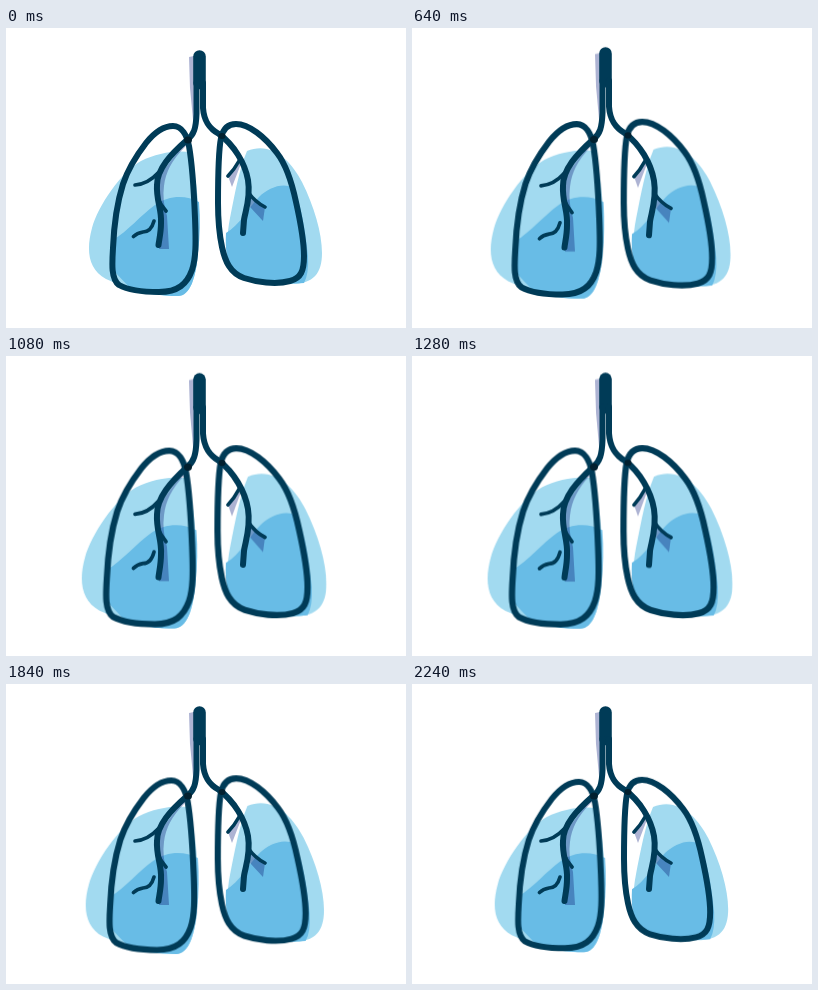
Animation, 400 px wide and 300 px high, one loop 2.28 s. Source, as an HTML page:

```html
<!DOCTYPE html>
<html lang="en">
<head>
<meta charset="utf-8">
<title>Breathing lungs</title>
<style>
  html, body { margin: 0; width: 100%; height: 100%; overflow: hidden; background: #fff; }
  svg { display: block; width: 100vw; height: 100vh; }

  .light { fill: #a2daf0; }
  .deep { fill: #68bce6; }
  .shade { fill: #adb3d3; mix-blend-mode: multiply; }
  .line { fill: none; stroke: #003b57; stroke-width: 6; stroke-linecap: round; stroke-linejoin: round; }
  .twig { stroke-width: 3.6; }
  .trunk { stroke-width: 12.6; }
  .cross { fill: #02202f; }

  .left, .right, .tree { animation: 2280ms infinite; }
  .left { transform-origin: 260px 170px; animation-name: left; }
  .right { transform-origin: 222px 170px; animation-name: right; }
  .tree { transform-origin: 193px 131px; animation-name: tree; }

  /* One step every 40 ms: 30 in, 27 out. */
  @keyframes left {
    0% { transform: scale(1, 1); animation-timing-function: steps(30); }
    52.6316% { transform: scale(1.045, 1.05); animation-timing-function: steps(27); }
    100% { transform: scale(1, 1); }
  }
  @keyframes right {
    0% { transform: scale(1, 1); animation-timing-function: steps(30); }
    52.6316% { transform: scale(1.052, 1.055); animation-timing-function: steps(27); }
    100% { transform: scale(1, 1); }
  }
  /* The windpipe settles before the lungs do. */
  @keyframes tree {
    0% { transform: scale(1, 1); animation-timing-function: steps(31); }
    54.386% { transform: scale(1, 1.055); animation-timing-function: steps(15); }
    80.7018%, 100% { transform: scale(1, 1); }
  }
</style>
</head>
<body>
<svg viewBox="0 0 400 300" role="img" aria-label="Breathing lungs">
  <g class="left">
    <path class="light" d="M184 124C170 122 150 125 135 133C115 144 92 178 86 200C80 222 82 241 100 251C120 260 150 269 172 268C184 268 190 250 192 225C195 190 191 150 184 124Z"/>
    <path class="deep" d="M107 212C122 203 135 187 149 177C163 167 180 167 193 174Q195 200 192 225C190 250 184 268 172 268C155 268 140 266 125 261L106 241Z"/>
  </g>
  <g class="right">
    <path class="light" d="M241 123C266 113 285 133 296 154C308 178 316 205 316 225C316 245 308 256 285 256C262 257 242 253 230 246C219 238 220 210 224 190C229 165 233 142 241 123Z"/>
    <path class="deep" d="M220 205C233 198 243 179 253 169C262 160 277 154 287 160C295 175 299 200 302 228Q303 246 298 255C275 257 242 254 229 247C221 239 219 222 220 205Z"/>
  </g>

  <g class="tree shade">
    <path d="M183 29L188 28L190 96L187 92L184 60Z"/>
    <path d="M191 97Q188 111 178 120Q160 138 158 158Q156 172 161 188L163 221L153 221L152 175L150 152L178 116Z"/>
    <path d="M222 148L226 159L236 133Z"/>
    <path d="M243 167L259 179L257 193L244 179Z"/>
  </g>

  <g class="left">
    <path class="line" d="M167 98C176 98 181 108 183 118C186 135 188 165 189 190C190 215 190 230 186 242C181 256 172 264 153 264C137 264 122 262 113 257C105 251 106 236 107 220C108 196 111 175 117 156C122 141 130 128 140 115C148 105 157 98 167 98Z"/>
  </g>
  <g class="right">
    <path class="line" d="M230 96C243 96 259 109 271 125C281 138 286 155 290 174C294 192 298 212 298 228C298 243 295 250 284 253C270 257 250 254 238 250C224 245 219 233 216 219C213 205 212 190 212 175C212 150 212 125 215 110C217 101 222 96 230 96Z"/>
  </g>

  <g class="tree">
    <path class="line trunk" d="M193.500 28.500V55"/>
    <path class="line" d="M190.500 55V86C190 100 188 107 181 112C165 126 151 141 151 157C150 172 156 182 155 195C155 205 153 212 152.500 217"/>
    <path class="line" d="M197 55V80C198 94 204 101 213 106C228 117 239 135 242 152C245 170 239 184 238 192L237 205"/>
    <path class="line twig" d="M152 145Q142 156 129 157M151 169Q155 177 160 183M148 193Q145 204 137 204Q131 205 127.500 208.500M233 133Q228 142 222 148M242 164Q249 174 259 179"/>
    <ellipse class="cross" cx="182" cy="112" rx="4" ry="3.500"/>
    <ellipse class="cross" cx="216" cy="108" rx="3.500" ry="3"/>
  </g>
</svg>
</body>
</html>
```
